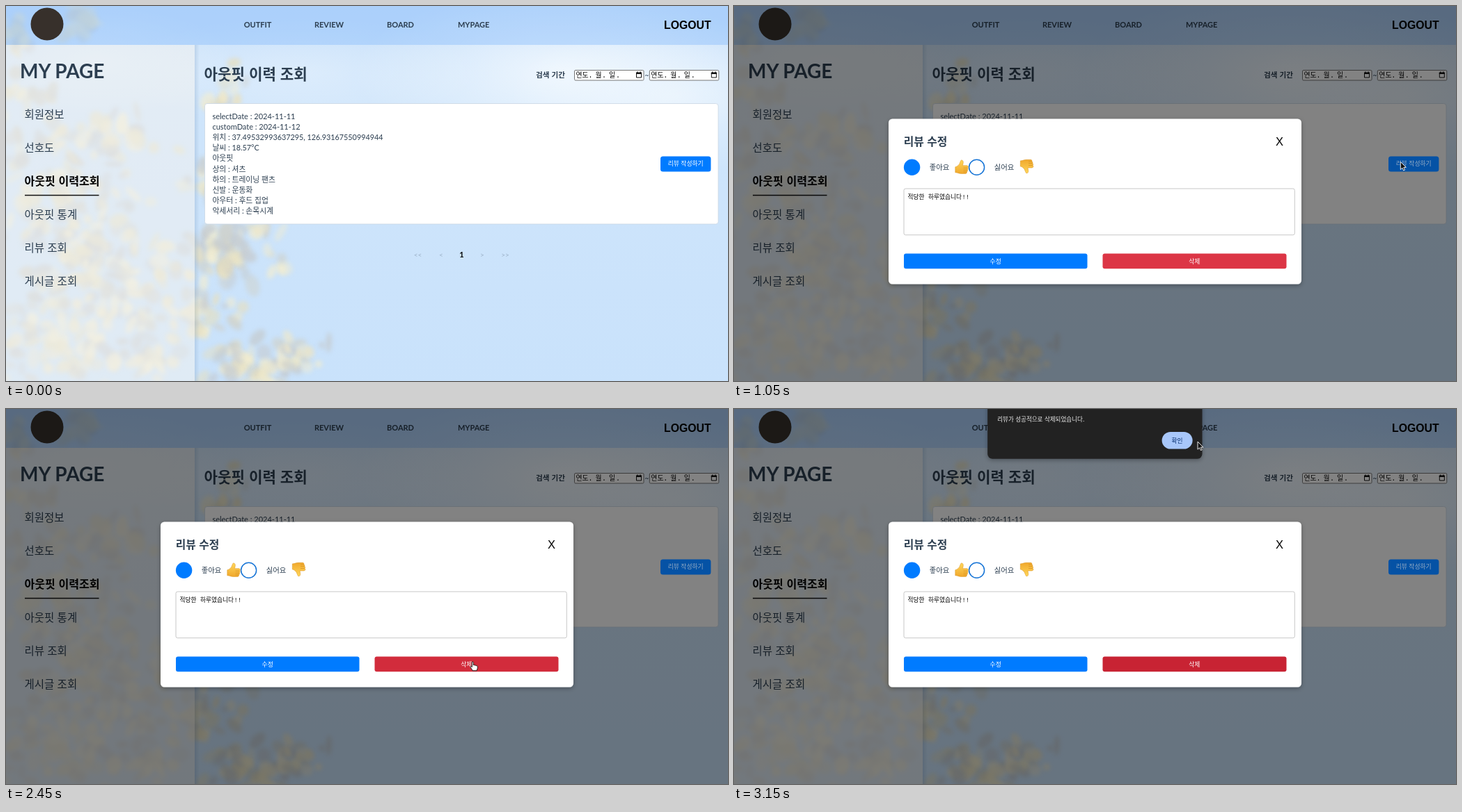
Recreate the animation shown at these times as an HTML page with a canvas. Size 1037 by 540 pixels, loop 3.29 s.

```html
<!DOCTYPE html>
<html lang="ko">
<head>
<meta charset="utf-8">
<title>My page</title>
<style>
  html, body { margin: 0; width: 100%; height: 100%; overflow: hidden; background: #cae2fb; }
  #sky, svg { position: absolute; left: 0; top: 0; width: 1037px; height: 540px; }
  text { font-family: Lato, "Noto Sans CJK KR", "Noto Sans CJK", sans-serif; fill: #2c3e50; white-space: pre; }
  .k text, text.k { font-family: "Noto Sans CJK KR", "Noto Sans CJK", sans-serif; }
  .arial { font-family: "Liberation Sans", Arial, sans-serif; fill: #000; }
  .mono { font-family: "Liberation Mono", monospace; fill: #000; }
  .b { font-weight: 700; }
  .m { font-weight: 500; }
  .mid { text-anchor: middle; }
  .white { fill: #fff; }
  .black { fill: #000; }
</style>
</head>
<body>
<canvas id="sky" width="1037" height="540"></canvas>
<svg viewBox="0 0 1037 540">
  <defs>
    <linearGradient id="edge"><stop stop-color="#5a7fa8" stop-opacity=".2"/><stop offset="1" stop-color="#5a7fa8" stop-opacity="0"/></linearGradient>
    <linearGradient id="skin" x2="0" y2="1"><stop stop-color="#ffd65a"/><stop offset="1" stop-color="#f0a82c"/></linearGradient>
    <filter id="soft" x="-10%" y="-20%" width="120%" height="150%"><feDropShadow dx="0" dy="2" stdDeviation="3" flood-opacity=".3"/></filter>
    <g id="thumb">
      <path fill="url(#skin)" stroke="#d99320" stroke-width=".5" d="M9 1c2-1 3.8 1 3.2 4l-.7 3.5h5.7c2.4 0 2.9 2.6 1.4 3.4 1 .9.7 2.6-.4 3 .7 1 .3 2.3-.8 2.7.4 1.2-.3 2.6-1.8 2.6H9.5C6 20.2 4.5 18.8.8 18.6v-8C4 10 7 7 7.6 4Z"/>
      <path fill="none" stroke="#d08a1c" stroke-width=".6" d="M12.5 12h6M12.5 15h5.6M12.5 17.7h4.8"/>
    </g>
    <g id="date">
      <rect x=".5" y=".5" width="99.5" height="14.5" rx="1.5" fill="#fff" stroke="#767676"/>
      <g class="k" font-size="9.9"><text class="black" x="2.5" y="11">연도</text><text class="black" x="30.5" y="11">월</text><text class="black" x="50" y="11">일</text></g>
      <g font-size="10"><text class="mono" x="20.5" y="11">.</text><text class="mono" x="40" y="11">.</text><text class="mono" x="60" y="11">.</text></g>
      <path d="M89.5 4.5h7v6.5h-7Z" fill="none" stroke="#111"/><path d="M89 3.5h8v2.6h-8ZM90.3 2.5h1.3v2h-1.3ZM94.4 2.5h1.3v2h-1.3Z" fill="#111"/>
    </g>
  </defs>

  <rect width="1037" height="56" fill="#8abdfb" fill-opacity=".45"/>
  <rect y="56" width="271" height="484" fill="#f3f3f1" fill-opacity=".55"/>
  <rect x="271" y="56" width="7" height="484" fill="url(#edge)"/>
  <circle cx="59" cy="26" r="23.5" fill="#37302b"/>

  <g class="b mid" font-size="11">
    <text x="361.5" y="31">OUTFIT</text><text x="464" y="31">REVIEW</text>
    <text x="566.5" y="31">BOARD</text><text x="671.7" y="31">MYPAGE</text>
  </g>
  <text class="arial b" x="945" y="32.7" font-size="15.8">LOGOUT</text>

  <text class="b" x="20" y="104" font-size="28">MY PAGE</text>
  <g class="k" font-size="15.5">
    <text x="26.5" y="161.7">회원정보</text>
    <text x="26.5" y="209.5">선호도</text>
    <text class="b black" x="26.5" y="258" font-size="16.1">아웃핏 이력조회</text>
    <text x="26.5" y="306">아웃핏 통계</text>
    <text x="26.5" y="354.3">리뷰 조회</text>
    <text x="26.5" y="402.4">게시글 조회</text>
  </g>
  <rect x="27" y="271.8" width="106.5" height="1.5" fill="#111"/>

  <text class="k b" x="284.5" y="106.3" font-size="21.2">아웃핏 이력 조회</text>
  <text class="k b" x="761" y="103" font-size="10.6">검색 기간</text>
  <use href="#date" x="816" y="92"/><use href="#date" x="923.8" y="92"/>
  <text class="mid" x="920.3" y="103" font-size="10">~</text>

  <rect x="285.5" y="140.5" width="737.5" height="173.5" rx="3.5" fill="#fff" stroke="#c9d6e4" stroke-width=".8"/>
  <g id="info"></g>

  <g class="mid" font-size="10">
    <g opacity=".3"><text x="591.5" y="361.5">&lt;&lt;</text><text x="625" y="361.5">&lt;</text><text x="684" y="361.5">&gt;</text><text x="717" y="361.5">&gt;&gt;</text></g>
    <text class="b black" x="654.5" y="361.7" font-size="11">1</text>
  </g>

  <rect id="dim" width="1037" height="540" fill-opacity=".49"/>
  <rect id="write" x="940" y="216.5" width="72.4" height="22" rx="3.5"/>
  <text id="writeText" class="k mid" x="976.2" y="230.3" font-size="8.8">리뷰 작성하기</text>

  <g id="modal">
    <rect x="222" y="162.5" width="593" height="238" rx="5.5" fill="#fff" filter="url(#soft)"/>
    <text class="k b" x="243.7" y="201" font-size="15.8">리뷰 수정</text>
    <text class="arial mid" x="783.6" y="200.5" font-size="16.5">X</text>
    <circle cx="255.6" cy="232.2" r="11.7" fill="#007bff"/>
    <circle cx="348.6" cy="232.2" r="11" fill="#fff" stroke="#1674d6" stroke-width="1.5"/>
    <g class="k" font-size="10.4"><text x="280.7" y="235.8">좋아요</text><text x="373.7" y="235.8">싫어요</text></g>
    <use href="#thumb" x="317" y="221.2"/>
    <use href="#thumb" transform="translate(410.5 241.5) scale(1 -1)"/>
    <rect x="244" y="263" width="561.3" height="66.7" rx="2.5" fill="#fff" stroke="#c8c8c8"/>
    <g class="k" font-size="8.7"><text class="black" x="249.6" y="277.6">적당한</text><text class="black" x="279" y="277.6">하루였습니다</text></g>
    <text class="mono" x="327.4" y="277.6" font-size="8.8">!!</text>
    <rect x="244" y="356.5" width="263.5" height="21.7" rx="3" fill="#007bff"/>
    <rect id="del" x="529.5" y="356.5" width="264" height="21.7" rx="3"/>
    <g class="k mid" font-size="8.8"><text class="white" x="375.7" y="370.5">수정</text><text class="white" x="661.3" y="370.5">삭제</text></g>
  </g>

  <g id="alert">
    <rect x="364.2" y="-30" width="308.3" height="101.7" rx="7" fill="#202020" filter="url(#soft)"/>
    <text class="k" x="378.2" y="18.4" font-size="8.55" style="fill:#ececec">리뷰가 성공적으로 삭제되었습니다.</text>
    <rect x="614.6" y="33" width="44" height="24.6" rx="12.3" fill="#a8c7fa"/>
    <text class="k m mid" x="636.4" y="48.6" font-size="8.7" style="fill:#062e6f">확인</text>
  </g>

  <g id="cursor" stroke-linejoin="round">
    <path id="arrow" fill="#111" stroke="#fff" stroke-width=".9" d="M0 0V11.2L2.6 8.8 4.4 12.6 6.2 11.8 4.5 8.1H8Z"/>
    <path id="hand" fill="#fff" stroke="#111" stroke-width=".9" d="M-1 .5c0-1.6 2-1.6 2 0v4c.4-.9 2-.8 2.2.2.6-.6 1.9-.4 2 .6.7-.4 1.8 0 1.8 1v2.2c0 1.6-1.2 2.2-1.2 3.7H-.2C-.5 10.5-3.2 8-3.2 6.6c0-1 1.3-1 2.2.4Z"/>
    <path id="beam" fill="none" stroke="#222" stroke-width="1" d="M-2.5-5.5Q0-5.5 0-4.5 0-5.5 2.5-5.5M0-4.5V4.5M-2.5 5.5Q0 5.5 0 4.5 0 5.5 2.5 5.5M-1.2 1.8H1.2"/>
  </g>
</svg>
<script>
const $ = id => document.getElementById(id);
const clamp = v => Math.min(1, Math.max(0, v));
const lerp = (a, b, k) => a + (b - a) * k;
const mix = (a, b, k) => `rgb(${a.map((v, i) => Math.round(lerp(v, b[i], k)))})`;
const show = (id, on) => { $(id).style.display = on ? '' : 'none'; };

// Outfit record
const lines = ['selectDate : 2024-11-11', 'customDate : 2024-11-12',
  '위치 : 37.49532993637295, 126.93167550994944', '날씨 : 18.57°C', '아웃핏', '상의 : 셔츠',
  '하의 : 트레이닝 팬츠', '신발 : 운동화', '아우터 : 후드 집업', '악세서리 : 손목시계'];
$('info').innerHTML = lines.map((s, i) =>
  `<text x="296.4" y="${163 + 15.1 * i}" font-size="${i < 2 ? 11 : 10.8}">${s}</text>`).join('');

// Blurred sky with blossoms
let seed = 11;
const rnd = () => (seed = (seed * 16807) % 2147483647) / 2147483647;
const spread = () => rnd() + rnd() - 1;

function paintSky() {
  const c = $('sky').getContext('2d');
  const g = c.createLinearGradient(0, 0, 0, 540);
  g.addColorStop(0, '#c6dffa');
  g.addColorStop(.25, '#cfe5fb');
  g.addColorStop(1, '#c9e2fb');
  c.fillStyle = g;
  c.fillRect(0, 0, 1037, 540);

  const glow = (x, y, rx, ry, a) => {
    c.save();
    c.translate(x, y);
    c.scale(rx, ry);
    const r = c.createRadialGradient(0, 0, 0, 0, 0, 1);
    r.addColorStop(0, `rgba(250,253,255,${a})`);
    r.addColorStop(1, 'rgba(250,253,255,0)');
    c.fillStyle = r;
    c.fillRect(-1, -1, 2, 2);
    c.restore();
  };
  glow(800, 95, 300, 120, .75);
  glow(960, 130, 240, 110, .5);
  glow(420, 95, 260, 80, .35);
  glow(130, 80, 200, 80, .4);

  // x, y, half width, half height, count
  const clusters = [
    [110, 190, 140, 60, 55], [90, 290, 150, 80, 95], [140, 390, 190, 90, 130],
    [110, 490, 190, 80, 120], [310, 135, 42, 70, 24], [300, 250, 60, 45, 20],
    [320, 355, 85, 50, 50], [300, 440, 50, 55, 20], [370, 515, 100, 42, 55],
    [10, 40, 24, 45, 16], [108, 22, 30, 34, 16], [30, 130, 60, 40, 14]];
  const tones = ['#c5cbd0', '#cfd0c9', '#efe8c9', '#f3edd0', '#e5dfc2'];
  c.filter = 'blur(3px)';
  for (const [x, y, w, h, n] of clusters)
    for (let i = 0; i < n; i++) {
      c.globalAlpha = .45 + .4 * rnd();
      c.fillStyle = tones[Math.floor(rnd() * tones.length)];
      c.beginPath();
      c.ellipse(x + spread() * w, y + spread() * h, 5 + 11 * rnd(), 4 + 7 * rnd(), rnd() * 3, 0, 7);
      c.fill();
    }
  c.filter = 'none';
  c.globalAlpha = 1;
}
paintSky();

// Pointer stops: ms, x, y
const stops = [[70, 905, 524], [350, 961, 231], [490, 962, 234], [630, 962, 234], [980, 957.3, 224.3],
  [1190, 957.3, 224.3], [1610, 651.5, 298.6], [1820, 651.5, 298.6], [2380, 670.3, 364.6],
  [2940, 670.3, 364.6], [3010, 671, 295], [3080, 663, 135], [3150, 666, 47]];

function pointer(t) {
  const i = stops.findIndex(s => s[0] >= t);
  if (i < 0) return stops[stops.length - 1].slice(1);
  if (i === 0) return stops[0].slice(1);
  const [a, b] = [stops[i - 1], stops[i]];
  const u = (t - a[0]) / (b[0] - a[0]), k = u * u * (3 - 2 * u);
  return [lerp(a[1], b[1], k), lerp(a[2], b[2], k)];
}

const inside = (x, y, l, t, r, b) => x >= l && x <= r && y >= t && y <= b;

function shape(t, x, y) {
  if (t < 1050) return inside(x, y, 940, 216, 1012, 239) ? 'hand' : 'arrow';
  if (inside(x, y, 244, 263, 805, 330) && t < 2660) return 'beam';
  return t < 2660 && inside(x, y, 529, 356, 794, 379) ? 'hand' : 'arrow';
}

const LOOP = 3290, STEP = 70, OPEN = 1050, ASK = 2660;

function draw(t) {
  const open = t >= OPEN;
  show('dim', open);
  show('modal', open);
  $('write').style.fill = open ? '#0552a5' : mix([0, 123, 255], [0, 86, 179], clamp((t - 300) / 180));
  $('writeText').style.fill = open ? '#93aac4' : '#fff';
  $('del').style.fill = mix([220, 53, 69], [200, 35, 51], clamp((t - 2310) / 280));

  const k = 1 - Math.pow(1 - clamp((t - ASK) / 280), 2.4);
  show('alert', k > 0);
  $('alert').setAttribute('opacity', k);
  $('alert').setAttribute('transform',
    `translate(518.3 ${-20 * (1 - k)}) scale(${.97 + .03 * k} 1) translate(-518.3 0)`);

  const [x, y] = pointer(t), kind = shape(t, x, y);
  show('cursor', t >= 70);
  $('cursor').setAttribute('transform', `translate(${x} ${y})`);
  for (const id of ['arrow', 'hand', 'beam']) show(id, id === kind);
}

const start = performance.now();
function tick() {
  const t = (performance.now() - start) % LOOP;
  draw(Math.floor(t / STEP) * STEP);
  requestAnimationFrame(tick);
}
draw(0);
requestAnimationFrame(tick);
</script>
</body>
</html>
```
